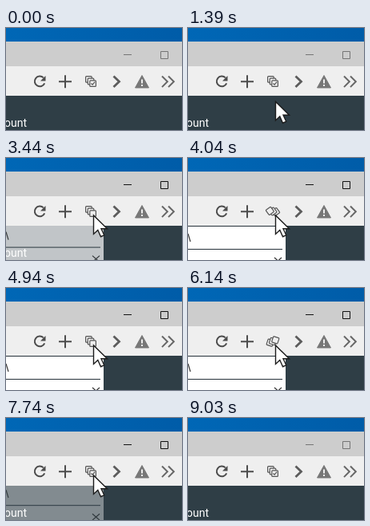
Animation, 220 px wide and 128 px high, one loop 9.07 s. Source, as an HTML page:

```html
<!DOCTYPE html>
<html lang="en">
<head>
<meta charset="utf-8">
<title>Toolbar button</title>
<style>
html, body { margin: 0; width: 100%; height: 100%; overflow: hidden; background: #2f3e46; }
svg { display: block; width: 100vw; height: 100vh; }
text { font-family: Roboto, Arial, sans-serif; font-size: 14px; }
</style>
</head>
<body>
<svg viewBox="0 0 220 128" fill="none">
  <defs>
    <linearGradient id="sky" x2="1" y2="0">
      <stop stop-color="#0067b6"/>
      <stop offset="1" stop-color="#005ca8"/>
    </linearGradient>
  </defs>
  <rect width="220" height="17" fill="url(#sky)"/>
  <rect y="17" width="220" height="31" fill="#cdcdcd"/>
  <rect y="48" width="220" height="37" fill="#efefef"/>
  <rect y="85" width="220" height="43" fill="#2f3e46"/>

  <g id="buttons">
    <path d="M147 33.5h10M193.5 29.5h9v9h-9z"/>
  </g>

  <g stroke="#4c4c4c" stroke-width="2">
    <path d="M46.8 62.4A6.4 6.4 0 1 0 48.2 69.3"/>
    <path d="M49.5 60v6.5H43z" fill="#4c4c4c" stroke="none"/>
    <path d="M66 67.2h16M74 59.2v16"/>
    <path d="M134.5 60.5l7 6.8-7 6.8" stroke="#5c5c5c" stroke-width="2.8"/>
    <path d="M195 60.5l6.8 6.8-6.8 6.8M203 60.5l6.8 6.8-6.8 6.8" stroke="#666"/>
  </g>
  <path d="M170 59.5L178.5 75h-17z" fill="#777" stroke="#777" stroke-linejoin="round"/>
  <path d="M170 64.5v5M170 71v2" stroke="#efefef" stroke-width="2"/>

  <g id="stack" stroke="#555" stroke-width="1.2" fill="#efefef">
    <rect x="99.6" y="60.6" width="7.6" height="7.6" rx="1"/>
    <rect x="102.2" y="63.2" width="7.6" height="7.6" rx="1"/>
    <rect x="104.8" y="65.8" width="7.6" height="7.6" rx="1"/>
    <path id="tick" d="M106.5 69.5l1.6 1.7 3-3.6" fill="none"/>
  </g>

  <text x="26" y="124" text-anchor="end" fill="#fff">Account</text>

  <svg y="85" width="220" height="43" viewBox="0 85 220 43">
    <g id="panel">
      <rect y="70" width="122" height="70" fill="#fff"/>
      <path d="M0 85.5h122M0 114.5h118" stroke="#26323a"/>
      <path d="M0 95l3 10M108 125l9 8M117 125l-9 8" stroke="#333" stroke-width="1.2"/>
    </g>
  </svg>

  <path id="cursor" d="M0 0v23.5l5.3-5 3.7 8.2 4.2-1.9-3.7-8H17z"
    fill="#fff" stroke="#1c1c1c" stroke-width="1.4"/>
</svg>
<script>
const LOOP = 9070;
const [buttons, stack, tick, panel, cursor] =
  ["buttons", "stack", "tick", "panel", "cursor"].map(id => document.getElementById(id));

const clamp = v => Math.max(0, Math.min(1, v));
const ramp = (t, from, to) => clamp((t - from) / (to - from));

// time, x, y of the pointer tip
const track = [
  [190, 93, 128], [1190, 110, 101], [1390, 109.5, 92.5],
  [2130, 109.5, 72], [8240, 109.5, 72], [8640, 120, 130]
];

function pointer(t) {
  let i = 0;
  while (i < track.length - 2 && t > track[i + 1][0]) i++;
  const [a, b] = [track[i], track[i + 1]];
  const k = ramp(t, a[0], b[0]);
  return [1, 2].map(n => a[n] + (b[n] - a[n]) * k);
}

function step(t) {
  const phase = t < 2240 ? 90 : 40;
  return Math.floor((t - phase) / 100) * 100 + phase;
}

function draw(time) {
  const t = step(time);

  const visible = time >= 290 && time < 8640;
  cursor.setAttribute("visibility", visible ? "visible" : "hidden");
  cursor.setAttribute("transform", `translate(${pointer(t)})`);

  const active = time >= 2240 && time < 9010;
  const fading = time >= 9010 && time < 9030;
  buttons.setAttribute("stroke", active ? "#111" : fading ? "#444" : "#747474");

  const busy = time >= 2440 && time < 6440;
  const angle = busy ? (t - 3440) / 1500 * 360 : 0;
  stack.setAttribute("transform", `rotate(${angle} 106 67)`);
  tick.setAttribute("visibility", busy ? "hidden" : "visible");

  const shown = ramp(t, 2740, 3740) - ramp(t, 7140, 8140);
  panel.setAttribute("opacity", shown);
  panel.setAttribute("transform", `translate(0 ${-8 * (1 - shown)})`);
}

const start = performance.now();
function tickClock() {
  draw((performance.now() - start) % LOOP);
  requestAnimationFrame(tickClock);
}
tickClock();
</script>
</body>
</html>
```
